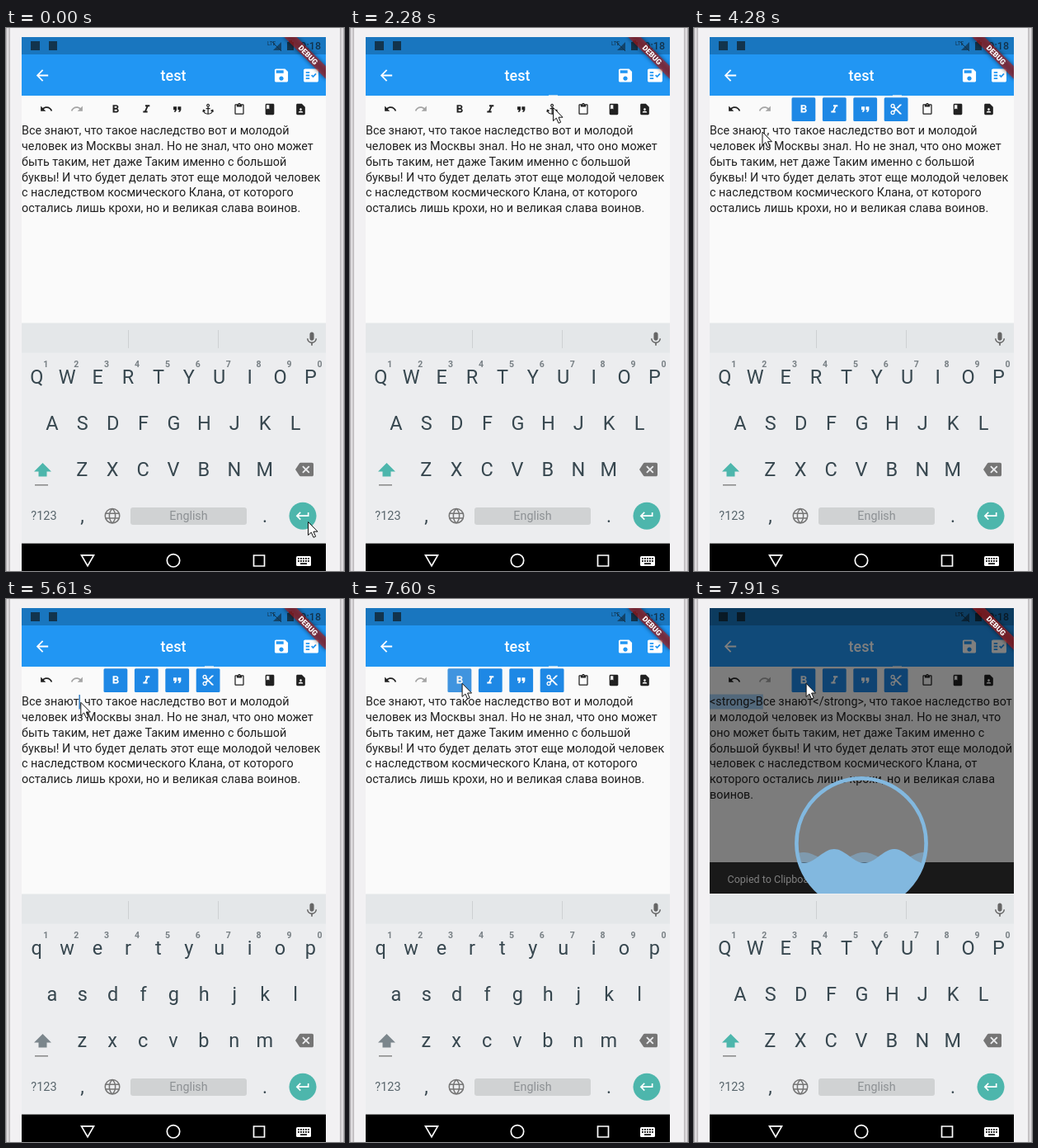
Recreate the animation shown at these times as an HTML page. Size 410 px wide and 658 px high, loop 7990 ms.

```html
<!DOCTYPE html>
<html lang="ru">
<head>
<meta charset="utf-8">
<style>
html, body { margin: 0; width: 100%; height: 100%; overflow: hidden; background: #f2f1f3; }
svg { display: block; }
text { font-family: Roboto, sans-serif; white-space: pre; }
</style>
</head>
<body>
<svg id="stage" width="410" height="658" viewBox="0 0 410 658"></svg>
<script>
const LOOP = 7990;
const PATHS = {
  back: 'M20 11H7.83l5.59-5.59L12 4l-8 8 8 8 1.41-1.41L7.83 13H20z',
  save: 'M17 3H5c-1.11 0-2 .9-2 2v14c0 1.1.89 2 2 2h14c1.1 0 2-.9 2-2V7zm-5 16c-1.66 0-3-1.34-3-3s1.34-3 3-3 3 1.34 3 3-1.34 3-3 3zm3-10H5V5h10z',
  check: 'M20 3H4c-1.1 0-2 .9-2 2v14c0 1.1.9 2 2 2h16c1.1 0 2-.9 2-2V5c0-1.1-.9-2-2-2zM10 17H5v-2h5zm0-4H5v-2h5zm0-4H5V7h5zm4.82 6L12 12.16l1.41-1.41 1.41 1.42L17.99 9l1.42 1.42z',
  undo: 'M12.5 8c-2.65 0-5.05.99-6.9 2.6L2 7v9h9l-3.62-3.62c1.39-1.16 3.16-1.88 5.12-1.88 3.54 0 6.55 2.31 7.6 5.5l2.37-.78C21.08 11.03 17.15 8 12.5 8z',
  redo: 'M18.4 10.6C16.55 8.99 14.15 8 11.5 8c-4.65 0-8.58 3.03-9.96 7.22L3.9 16c1.05-3.19 4.05-5.5 7.6-5.5 1.95 0 3.73.72 5.12 1.88L13 16h9V7z',
  bold: 'M15.6 10.79c.97-.67 1.65-1.77 1.65-2.79 0-2.26-1.75-4-4-4H7v14h7.04c2.09 0 3.71-1.7 3.71-3.79 0-1.52-.86-2.82-2.15-3.42zM10 6.5h3c.83 0 1.5.67 1.5 1.5s-.67 1.5-1.5 1.5h-3zm3.5 9H10v-3h3.5c.83 0 1.5.67 1.5 1.5s-.67 1.5-1.5 1.5z',
  italic: 'M10 4v3h2.21l-3.42 8H6v3h8v-3h-2.21l3.42-8H18V4z',
  quote: 'M6 17h3l2-4V7H5v6h3zm8 0h3l2-4V7h-6v6h3z',
  cut: 'M9.64 7.64c.23-.5.36-1.05.36-1.64 0-2.21-1.79-4-4-4S2 3.79 2 6s1.79 4 4 4c.59 0 1.14-.13 1.64-.36L10 12l-2.36 2.36C7.14 14.13 6.59 14 6 14c-2.21 0-4 1.79-4 4s1.79 4 4 4 4-1.79 4-4c0-.59-.13-1.14-.36-1.64L12 14l7 7h3v-1zM6 8c-1.1 0-2-.89-2-2s.9-2 2-2 2 .89 2 2-.9 2-2 2zm0 12c-1.1 0-2-.89-2-2s.9-2 2-2 2 .89 2 2-.9 2-2 2zM19 3l-6 6 2 2 7-7V3z',
  paste: 'M19 2h-4.18C14.4.84 13.3 0 12 0S9.6.84 9.18 2H5c-1.1 0-2 .9-2 2v16c0 1.1.9 2 2 2h14c1.1 0 2-.9 2-2V4c0-1.1-.9-2-2-2zm-7 0c.55 0 1 .45 1 1s-.45 1-1 1-1-.45-1-1 .45-1 1-1zm7 18H5V4h2v3h10V4h2z',
  book: 'M18 2H6c-1.1 0-2 .9-2 2v16c0 1.1.9 2 2 2h12c1.1 0 2-.9 2-2V4c0-1.1-.9-2-2-2zM6 4h5v8l-2.5-1.5L6 12z',
  contact: 'M14 2H6c-1.1 0-2 .9-2 2v16c0 1.1.9 2 2 2h12c1.1 0 2-.9 2-2V8zM12 10c1.1 0 2 .9 2 2s-.9 2-2 2-2-.9-2-2 .9-2 2-2zm4 8H8v-.57c0-.81.48-1.53 1.22-1.85a6.95 6.95 0 0 1 5.56 0c.74.32 1.22 1.04 1.22 1.85z',
  mic: 'M12 14c1.66 0 3-1.34 3-3V5c0-1.66-1.34-3-3-3S9 3.34 9 5v6c0 1.66 1.34 3 3 3zm5.3-3c0 3-2.54 5.1-5.3 5.1S6.7 14 6.7 11H5c0 3.41 2.72 6.23 6 6.72V21h2v-3.28c3.28-.48 6-3.3 6-6.72z',
  enter: 'M19 7v4H5.83l3.58-3.59L8 6l-6 6 6 6 1.41-1.41L5.83 13H21V7z',
  erase: 'M22 3H7c-.69 0-1.23.35-1.59.88L0 12l5.41 8.11c.36.53.9.89 1.59.89h15c1.1 0 2-.9 2-2V5c0-1.1-.9-2-2-2zm-3 12.59L17.59 17 14 13.41 10.41 17 9 15.59 12.59 12 9 8.41 10.41 7 14 10.59 17.59 7 19 8.41 15.41 12z'
};
const BEFORE = [
  'Все знают, что такое наследство вот и молодой',
  'человек из Москвы знал. Но не знал, что оно может',
  'быть таким, нет даже Таким именно с большой',
  'буквы! И что будет делать этот еще молодой человек',
  'с наследством космического Клана, от которого',
  'остались лишь крохи, но и великая слава воинов.'
];
const AFTER = [
  '&lt;strong&gt;Все знают&lt;/strong&gt;, что такое наследство вот',
  'и молодой человек из Москвы знал. Но не знал, что',
  'оно может быть таким, нет даже Таким именно с',
  'большой буквы! И что будет делать этот еще молодой',
  'человек с наследством космического Клана, от',
  'которого остались лишь крохи, но и великая слава',
  'воинов.'
];

const rect = (x, y, w, h, fill, more = '') =>
  `<rect x="${x}" y="${y}" width="${w}" height="${h}" fill="${fill}" ${more}/>`;
const label = (s, x, y, size, fill, more = '') =>
  `<text x="${x}" y="${y}" font-size="${size}" fill="${fill}" ${more}>${s}</text>`;
const MID = 'text-anchor="middle"';
const place = (body, cx, cy, size, more = '') =>
  `<g transform="translate(${cx - size / 2} ${cy - size / 2}) scale(${size / 24})" ${more}>${body}</g>`;
const icon = (name, cx, cy, size, fill) =>
  place(`<path d="${PATHS[name]}" fill="${fill}" fill-rule="evenodd"/>`, cx, cy, size);
const outline = (d, cx, cy, size, color, w) =>
  place(`<path d="${d}"/>`, cx, cy, size, `fill="none" stroke="${color}" stroke-width="${w}"`);
const paragraph = lines =>
  lines.map((s, i) => label(s, 19, 129 + i * 18.85, 14.35, '#212121')).join('');

const DARK = '#212121', KEY = '#37474f', GREY = '#757575';
const toolX = i => 132.9 + 37.4 * i;
const toolBox = (i, fill, more = '') =>
  rect(toolX(i) - 14.4, 84.2, 28.8, 28.8, fill, 'rx="1.5" ' + more);

function statusBar() {
  const ink = '#12344d';
  return rect(19, 11, 369, 22, '#1976bf') +
    rect(30, 16, 11, 11, ink) + rect(52, 16, 10, 11, ink) +
    label('LTE', 317, 21, 6.5, ink) +
    `<path d="M324 27L334 17V27Z" fill="${ink}" opacity=".75"/><path d="M323 17L334 28" stroke="${ink}"/>` +
    rect(341, 17, 8, 10, ink) + rect(343, 15, 4, 2, ink) +
    label('9:18', 382, 26, 12.5, ink, 'text-anchor="end" font-weight="500"');
}

function appBar() {
  return rect(19, 32, 369, 50, '#2196f3') + icon('back', 44, 57.5, 21.5, '#fff') +
    label('test', 203, 64, 17.95, '#fff', MID + ' font-weight="500"') +
    icon('save', 334, 57.5, 21.5, '#fff') + icon('check', 370, 57.5, 21.5, '#fff');
}

function tools(on) {
  const names = ['bold', 'italic', 'quote'];
  let s = icon('undo', 49, 98, 16.5, DARK) + icon('redo', 86, 98, 16.5, '#a4a4a4');
  if (on) for (let i = 0; i < 4; i++) s += toolBox(i, '#1e88e5');
  const ink = on ? '#fff' : DARK;
  names.forEach((n, i) => s += icon(n, toolX(i), 98.5, 16, ink));
  s += on ? icon('cut', toolX(3), 98.5, 16, ink)
    : outline('M12 7V21M8 10.5H16M3 14C4 19 8 21 12 21S20 19 21 14M2 17L3 13.5L6.5 15M22 17L21 13.5L17.5 15M14.2 4.6A2.2 2.2 0 1 1 9.8 4.6A2.2 2.2 0 1 1 14.2 4.6', toolX(3), 98.5, 15, ink, 2);
  return s + icon('paste', 283, 98.5, 15, DARK) + icon('book', 320, 98.5, 16, DARK) +
    icon('contact', 357.5, 98.5, 16, DARK);
}

function letters(upper) {
  const rows = [['qwertyuiop', 37.3], ['asdfghjkl', 55.8], ['zxcvbnm', 92.3]];
  const tint = upper ? '#4db6ac' : '#7b868c';
  return rows.map(([row, x0], r) => [...row].map((c, i) =>
    label(upper ? c.toUpperCase() : c, x0 + 36.9 * i, 431 + 56.1 * r, 23.5, KEY, MID)).join('')).join('') +
    `<path d="M44.5 527L55 537.5H49.5V543.5H39.5V537.5H34Z" fill="${tint}"/>`;
}

function keyboard() {
  let s = rect(19, 357, 369, 1, '#eef0f1') + rect(19, 358, 369, 267, '#ecedef') +
    rect(19, 358, 369, 35.5, '#e4e7e9') +
    rect(148, 366, 1, 22, '#cdd0d2') + rect(257, 366, 1, 22, '#cdd0d2') +
    icon('mic', 371, 377, 20.5, '#666');
  [...'1234567890'].forEach((d, i) =>
    s += label(d, 48.3 + 36.9 * i, 410.7, 10.5, '#777f84', MID + ' font-weight="700"'));
  return s + rect(35, 553, 16, 1.6, '#8d8d8d') + icon('erase', 362, 535, 22, GREY) +
    label('?123', 46, 596.2, 14.5, '#58656c', MID) + label(',', 92.5, 599, 23, KEY, MID) +
    label('.', 314, 599, 23, KEY, MID) +
    outline('M22 12A10 10 0 1 1 2 12A10 10 0 1 1 22 12M2.8 8.7H21.2M2.8 15.3H21.2M12 2C6.5 7 6.5 17 12 22C17.5 17 17.5 7 12 2', 129, 591.2, 21, GREY, 1.7) +
    rect(151, 581, 141, 21, '#d0d2d3', 'rx="3"') + label('English', 221.5, 596.2, 14.3, '#8d9194', MID) +
    '<circle cx="360" cy="591.2" r="16.5" fill="#4db6ac"/>' + icon('enter', 360, 591.2, 20, '#fff');
}

function navBar() {
  let s = rect(19, 624.6, 369, 34, '#000') +
    '<g fill="none" stroke="#fff" stroke-width="1.7"><path d="M91.5 638.8H106.5L99 651.8Z"/>' +
    '<circle cx="203" cy="645.3" r="7.7"/><path d="M300.5 639H313.5V652H300.5Z"/></g>' +
    rect(352, 640, 18, 12, '#fff', 'rx="1.5"');
  for (let i = 0; i < 5; i++)
    s += rect(354 + 3 * i, 642, 1.8, 1.8, '#000') + rect(354 + 3 * i, 645, 1.8, 1.8, '#000');
  return s + rect(357, 648.3, 8, 1.6, '#000');
}

// Striped edge of the phone, mirrored on the right
const edge = rect(0, 0, 5, 658, '#dfdcdf') + rect(0, 0, 1, 658, '#b5b1b4') + rect(3.5, 0, 1.2, 658, '#b5b1b4');
const bezel = rect(0, 0, 410, 658, '#f2f1f3') + edge +
  `<g transform="translate(410 0) scale(-1 1)">${edge}</g>`;

const banner = '<g clip-path="url(#screen)"><g transform="translate(388 11) rotate(45)">' +
  rect(-36, 25, 72, 10.8, '#000', 'opacity=".55" style="filter:blur(2.5px)"') +
  rect(-36, 25, 72, 10.8, '#b71c1c', 'fill-opacity=".6"') +
  label('DEBUG', 0, 33.7, 9.1, '#fff', MID + ' font-weight="900"') + '</g></g>';

document.getElementById('stage').innerHTML =
  '<defs><clipPath id="screen"><rect x="19" y="11" width="369" height="613"/></clipPath>' +
  '<clipPath id="page"><rect x="19" y="11" width="369" height="347.5"/></clipPath>' +
  '<clipPath id="disc"><circle cx="203" cy="296" r="79"/></clipPath></defs>' +
  bezel + rect(19, 11, 369, 347, '#fafafa') + statusBar() + appBar() +
  `<g id="off">${tools(false)}</g><g id="on">${tools(true)}</g>` +
  toolBox(0, '#c8c8c8', 'id="press" opacity=".2"') +
  rect(241, 81, 11, 1, '#a9d3f3', 'id="mark"') +
  `<g id="old">${paragraph(BEFORE)}</g>` +
  `<g id="new">${rect(19, 115.5, 64.8, 18, '#a6d2f8')}${paragraph(AFTER)}</g>` +
  rect(0, 116, 1.6, 17.5, '#4285c4', 'id="caret"') +
  '<g clip-path="url(#page)"><g id="snack">' + rect(19, 0, 369, 44, '#323232') +
  label('Copied to Clipboard', 40.5, 24.5, 12.56, '#fff') + '</g>' +
  rect(19, 11, 369, 347.5, '#000', 'id="dim"') +
  '<g id="loader"><g clip-path="url(#disc)" fill="#82b8df"><path id="wave2" opacity=".5"/><path id="wave1"/></g>' +
  '<circle cx="203" cy="296" r="78.6" fill="none" stroke="#82b8df" stroke-width="4.6"/></g></g>' +
  banner + keyboard() + `<g id="upper">${letters(true)}</g><g id="lower">${letters(false)}</g>` + navBar() +
  '<circle id="tap" r="15" fill="#bebebe" opacity=".5"/>' +
  '<path id="mouse" d="M.5 .5V16.6L4.3 13.2L7 19.3L9.6 18.2L7 12.2H12Z" fill="#fff" stroke="#111" stroke-width="1"/>';

const el = id => document.getElementById(id);
const show = (id, yes) => el(id).setAttribute('visibility', yes ? 'visible' : 'hidden');
const unit = v => Math.max(0, Math.min(1, v));
const within = (t, spans) => spans.some(([a, b]) => t >= a && t < b);

// Bursts of change: start, end, number of pictures
const BURSTS = [[0, 0, 1], [70, 780, 10], [880, 1650, 11], [1730, 2040, 5], [2200, 2600, 6],
  [2840, 3560, 10], [3720, 4280, 8], [4520, 4840, 5], [5150, 5150, 1], [5460, 5460, 1],
  [5610, 5610, 1], [6160, 6950, 11], [7040, 7280, 4], [7520, 7910, 6]];
function snap(t) {
  const [a, b, n] = BURSTS.filter(s => s[0] <= t).pop();
  if (n < 2) return a;
  const step = (b - a) / (n - 1);
  return a + step * Math.min(n - 1, Math.floor((t - a) / step + 0.15));
}

// Pointer stops: time, x, y
const STOPS = [[0, 366, 598], [780, 250, 216], [803, 250, 216], [1419, 113, 143], [1650, 165, 108],
  [2040, 246, 96], [2760, 246, 96], [3240, 142, 160], [3560, 124, 150], [3640, 124, 150],
  [4280, 82.5, 125.5], [4440, 82.5, 125.5], [4520, 90.3, 124.8], [6080, 90.3, 124.8], [6600, 196, 102],
  [6950, 153, 105], [7280, 135.6, 101.8], [LOOP, 135.6, 101.8]];
function pointer(t) {
  const i = Math.max(1, STOPS.findIndex(s => s[0] > t));
  const [a, x, y] = STOPS[i - 1], [b, u, v] = STOPS[i];
  const p = unit((t - a) / (b - a)), e = p * p * (3 - 2 * p);
  return [x + (u - x) * e, y + (v - y) * e];
}

function wave(crest, mid, amp) {
  let d = 'M122 380';
  for (let x = 122; x <= 284; x += 2)
    d += `L${x} ${(mid - amp * Math.cos((x - crest) / 73 * 2 * Math.PI)).toFixed(2)}`;
  return d + 'L284 380Z';
}

function draw(now) {
  const t = snap(now), [x, y] = pointer(t);
  el('mouse').setAttribute('transform', `translate(${x.toFixed(1)} ${y.toFixed(1)})`);
  show('tap', within(t, [[2200, 2270], [4520, 4590], [5460, 5600], [7520, 7590]]));
  el('tap').setAttribute('cx', x);
  el('tap').setAttribute('cy', y + 0.5);

  const active = t >= 2430, edited = t >= 7670, low = t >= 4670 && t < 7740;
  show('on', active);
  show('off', !active);
  show('press', within(t, [[7590, 7740]]));
  show('mark', t >= 2270);
  show('old', !edited);
  show('new', edited);
  show('lower', low);
  show('upper', !low);

  show('caret', within(t, [[500, 1000], [1500, 2000], [4600, 5150], [5460, 6160], [6700, 7200]]));
  el('caret').setAttribute('x', t < 4500 ? 19 : t < 5400 ? 82 : 88.4);

  const p = unit((t - 7640) / 270), rise = 1 - (1 - p) * (1 - p);
  show('snack', edited);
  el('snack').setAttribute('transform', `translate(0 ${358 - 39 * rise})`);
  el('dim').setAttribute('opacity', edited ? 0.5 * rise : 0);
  el('loader').setAttribute('opacity', edited ? rise : 0);
  const drift = (t - 7910) * 0.06;
  el('wave1').setAttribute('d', wave(170 + drift, 311.5, 8.5));
  el('wave2').setAttribute('d', wave(206 - drift, 313, 6));
}

function tick() {
  draw(performance.now() % LOOP);
  requestAnimationFrame(tick);
}
tick();
</script>
</body>
</html>
```
